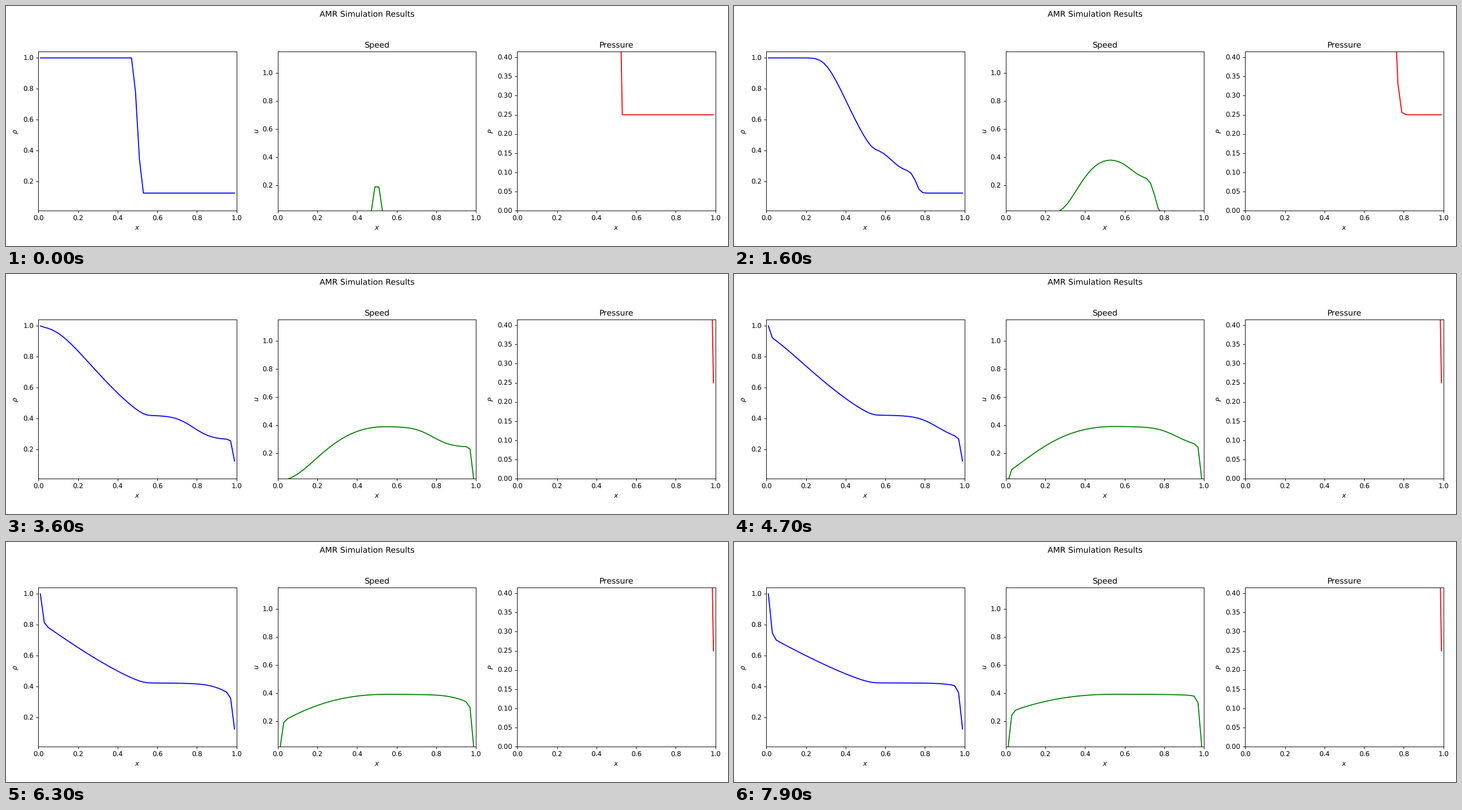
Write a matplotlib script that moves like this. It is 1280x427 px and loops after 8000 ms.

```python
import numpy as np
import matplotlib.pyplot as plt
from matplotlib.animation import FuncAnimation

W, H, DPI = 1280, 427, 64
FRAMES, INTERVAL = 80, 100
GAMMA, CELLS = 1.4, 50
TOP, BOTTOM, WIDTH = 81.4, 364.4, 351.3

# Enlarge the default point sizes to suit the low dpi.
for key in ("font.size", "lines.linewidth", "axes.linewidth",
            "axes.titlepad", "axes.labelpad",
            "xtick.major.size", "xtick.major.width", "xtick.major.pad",
            "ytick.major.size", "ytick.major.width", "ytick.major.pad"):
    plt.rcParams[key] *= 4 / 3
plt.rcParams["text.hinting"] = "none"


# Shock tube: conserved variables are density, momentum and energy.
def flux(q):
    rho, mom, energy = q
    u = mom / rho
    p = (GAMMA - 1) * (energy - 0.5 * mom * u)
    c = np.sqrt(GAMMA * p / rho)
    return np.array([mom, mom * u + p, u * (energy + p)]), u - c, u + c


def step(q, ratio):
    """Advance one step with the HLL flux; the end cells stay fixed."""
    f, slow, fast = flux(q)
    sl = np.minimum(np.minimum(slow[:-1], slow[1:]), 0)
    sr = np.maximum(np.maximum(fast[:-1], fast[1:]), 0)
    jump = q[:, 1:] - q[:, :-1]
    face = (sr * f[:, :-1] - sl * f[:, 1:] + sl * sr * jump) / (sr - sl)
    new = q.copy()
    new[:, 1:-1] -= ratio * (face[:, 1:] - face[:, :-1])
    return new


def simulate():
    left = x < 0.5
    q = np.array([np.where(left, 1.0, 0.125),
                  np.zeros(CELLS),
                  np.where(left, 1.0, 0.1) / (GAMMA - 1)])
    ratio = 0.5 / np.sqrt(GAMMA)
    states = []
    for _ in range(FRAMES):
        q = step(q, ratio)
        states.append(q)
    return states


def add_panel(fig, left, title, label, color, ylim, ticks):
    ax = fig.add_axes([left / W, 1 - BOTTOM / H, WIDTH / W, (BOTTOM - TOP) / H])
    ax.set_title(title)
    ax.set_xlabel("$x$")
    ax.set_ylabel(label)
    ax.set_xticks(np.linspace(0, 1, 6))
    ax.set_yticks(ticks)
    ax.set_xlim(0, 1)
    ax.set_ylim(*ylim)
    return ax.plot([], [], color=color)[0]


x = (np.arange(CELLS) + 0.5) / CELLS
states = simulate()

fig = plt.figure(figsize=(W / DPI, H / DPI), dpi=DPI)
fig.suptitle("AMR Simulation Results")
coarse = np.arange(1, 6) / 5
fine = np.arange(9) / 20
lines = [
    add_panel(fig, 57.4, "", r"$\rho$", "blue", (0.01, 1.04), coarse),
    add_panel(fig, 481.9, "Speed", "$u$", "green", (0.02, 1.15), coarse),
    add_panel(fig, 906.4, "Pressure", "$P$", "red", (0, 0.414), fine),
]


def update(i):
    for line, values in zip(lines, states[i]):
        line.set_data(x, values)
    return lines


anim = FuncAnimation(fig, update, frames=FRAMES, interval=INTERVAL,
                     init_func=lambda: update(0), repeat=True)
plt.show()
```
